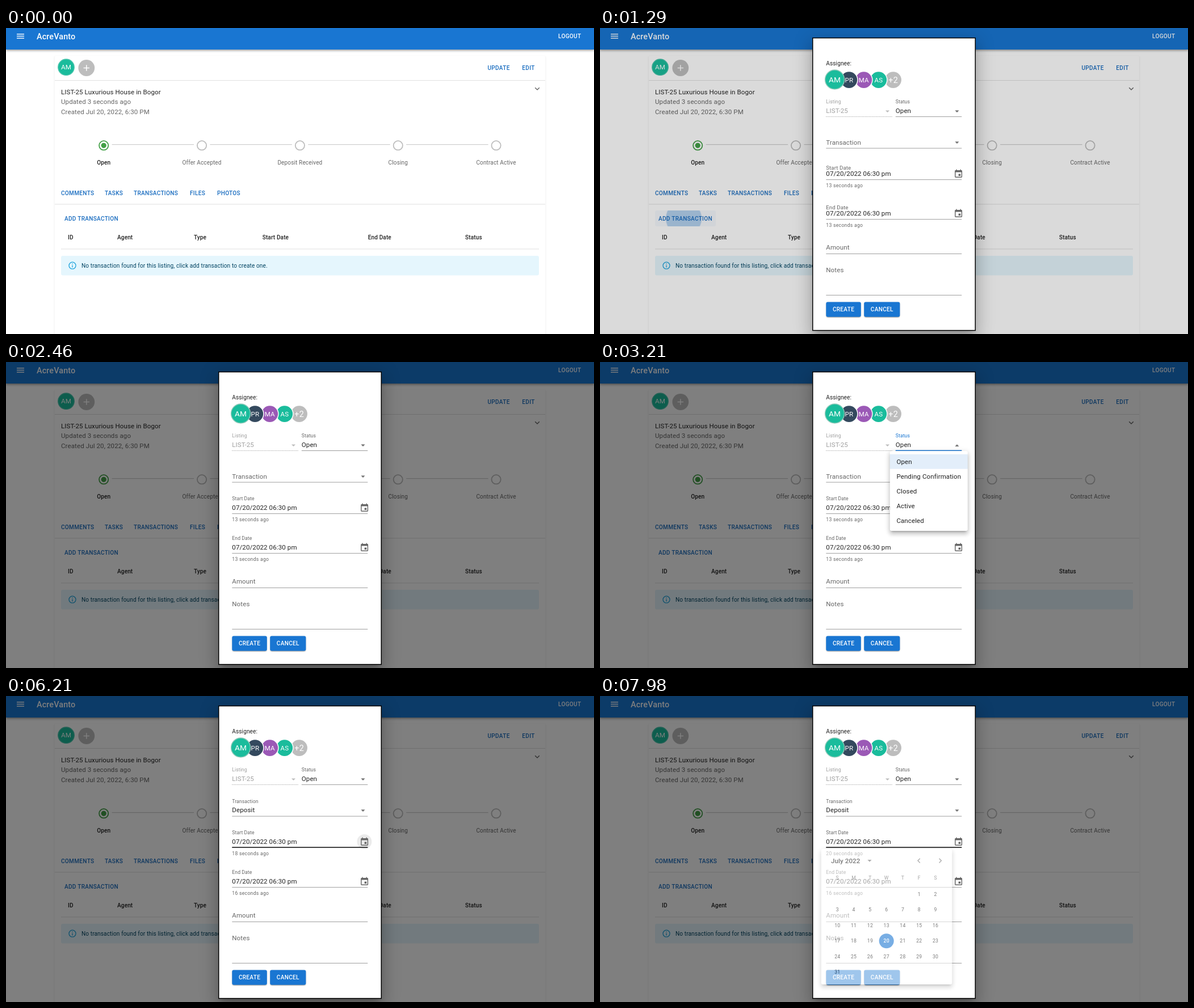
An HTML page that plays this animation: 1036x540 px, repeating every 8 s.

```html
<!DOCTYPE html>
<html lang="en">
<head>
<meta charset="utf-8">
<title>Add transaction</title>
<style>
  html, body { margin: 0; width: 100%; height: 100%; overflow: hidden; background: #fff; }
  svg {
    display: block; width: 1036px; height: 540px;
    --ease: cubic-bezier(.4, 0, .2, 1);
    --out: cubic-bezier(0, 0, .2, 1);
    --blue: #1976d2;
    --grey: rgba(0, 0, 0, .6);
  }
  text { font: 400 11.52px Roboto, sans-serif; letter-spacing: .00938em; fill: rgba(0, 0, 0, .87); white-space: pre; }
  .brand { font-size: 14.4px; font-weight: 500; letter-spacing: .0075em; }
  .small { font-size: 10.08px; letter-spacing: .01071em; }
  .btn { font-size: 10.08px; font-weight: 500; letter-spacing: .02857em; fill: #1a6dc0; }
  .cap { font-size: 8.64px; letter-spacing: .0333em; }
  .lab { font-size: 8.64px; }
  .dim { fill: var(--grey); }
  .off { fill: rgba(0, 0, 0, .38); }
  .white { fill: #fff; }
  .bold { font-weight: 500; }
  .mid { text-anchor: middle; }
  .info { fill: #014361; }

  /* 1% = 80 ms */
  .anim { animation: 8s var(--ease) infinite; }
  .step { animation: 8s step-end infinite; }
  .out { animation: 8s var(--out) infinite; }

  .hover { animation-name: hover; }
  .ripple { animation-name: ripple; transform-origin: 147.5px 336px; }
  .backdrop { animation-name: backdrop; }
  .modal { animation-name: modal; }
  .date-label { animation-name: date-label; }
  @keyframes hover { 0%, 6% { opacity: 0 } 9.1%, 15.9% { opacity: 1 } 19%, 100% { opacity: 0 } }
  @keyframes ripple {
    0%, 13.6% { transform: scale(0); opacity: .1 }
    15.4% { opacity: .3 }
    20.5%, 100% { transform: scale(1) }
    22.25%, 100% { opacity: 0 }
  }
  @keyframes backdrop { 0%, 15.375% { opacity: 0 } 18.2%, 100% { opacity: .5 } }
  @keyframes modal { 0% { opacity: 0 } 15.375%, 100% { opacity: 1 } }
  @keyframes date-label {
    0%, 15.375% { transform: translate(0, 16.5px) scale(1.3333) }
    17.875%, 100% { transform: translate(0, 0) scale(1) }
  }

  .status-label { animation-name: status-label; }
  .status-hover { animation-name: status-hover; }
  .status-focus { animation-name: status-focus; transform-origin: 579px 156px; }
  .status-arrow { animation-name: status-arrow; }
  .status-menu { animation-name: status-menu; transform-origin: 579.5px 157px; }
  @keyframes status-label { 0%, 34.5% { fill: var(--grey) } 37%, 48% { fill: var(--blue) } 50.5%, 100% { fill: var(--grey) } }
  @keyframes status-hover { 0%, 30.6% { opacity: 0 } 32.6%, 34.5% { opacity: 1 } 36.8%, 100% { opacity: 0 } }
  @keyframes status-focus { 0%, 34.5% { transform: scaleX(0) } 37%, 48% { transform: scaleX(1) } 50.5%, 100% { transform: scaleX(0) } }
  @keyframes status-arrow { 0% { transform: scaleY(1) } 34.5% { transform: scaleY(-1) } 41.9%, 100% { transform: scaleY(1) } }
  @keyframes status-menu {
    0%, 34.3% { opacity: 0; transform: scale(.75, .5625) }
    36.6%, 43% { transform: scale(1, 1) }
    37.8%, 41.9% { opacity: 1 }
    45.4%, 100% { opacity: 0; transform: scale(.75, .5625) }
  }

  .type-label { animation-name: type-label; }
  .type-focus { animation-name: type-focus; transform-origin: 518px 212px; }
  .type-arrow { animation-name: type-arrow; }
  .type-menu { animation-name: type-menu; transform-origin: 518px 213px; }
  .type-value { animation-name: type-value; }
  @keyframes type-label {
    0%, 48% { transform: translate(0, 16.5px) scale(1.3333); fill: var(--grey) }
    50.5%, 100% { transform: translate(0, 0) scale(1) }
    50.5%, 73.1% { fill: var(--blue) }
    75.6%, 100% { fill: var(--grey) }
  }
  @keyframes type-focus { 0%, 48% { transform: scaleX(0) } 50.5%, 73.1% { transform: scaleX(1) } 75.6%, 100% { transform: scaleX(0) } }
  @keyframes type-arrow { 0% { transform: scaleY(1) } 48.4% { transform: scaleY(-1) } 58.1%, 100% { transform: scaleY(1) } }
  @keyframes type-menu {
    0%, 48.4% { opacity: 0; transform: scale(.75, .5625) }
    50.6%, 59.2% { transform: scale(1, 1) }
    51.7%, 58.1% { opacity: 1 }
    61.4%, 100% { opacity: 0; transform: scale(.75, .5625) }
  }
  @keyframes type-value { 0% { opacity: 0 } 58.3%, 100% { opacity: 1 } }

  .ago13 { animation-name: ago13; }
  .ago16 { animation-name: ago16; }
  .ago16-end { animation-name: ago16-end; }
  .ago18 { animation-name: ago18; }
  .ago20 { animation-name: ago20; }
  @keyframes ago13 { 0% { opacity: 1 } 58.5%, 100% { opacity: 0 } }
  @keyframes ago16 { 0% { opacity: 0 } 58.5% { opacity: 1 } 76.9%, 100% { opacity: 0 } }
  @keyframes ago16-end { 0% { opacity: 0 } 58.5%, 100% { opacity: 1 } }
  @keyframes ago18 { 0% { opacity: 0 } 76.9% { opacity: 1 } 98.2%, 100% { opacity: 0 } }
  @keyframes ago20 { 0% { opacity: 0 } 98.2%, 100% { opacity: 1 } }

  .start-hover { animation-name: start-hover; }
  .icon-hover { animation-name: icon-hover; }
  .picker { animation-name: picker; transform-origin: 505px 270px; }
  @keyframes start-hover { 0%, 64.3% { opacity: 0 } 67.5%, 100% { opacity: 1 } }
  @keyframes icon-hover { 0%, 73.1% { opacity: 0 } 75%, 78.75% { opacity: 1 } 80.6%, 100% { opacity: 0 } }
  @keyframes picker {
    0%, 78.6% { opacity: 0; transform: scale(.75, .5625) }
    81.3%, 100% { transform: scale(1, 1) }
    82.6% { opacity: 1 }
    98.46% { opacity: 1; animation-timing-function: cubic-bezier(.557, 0, .667, .518) }
    100% { opacity: .45 }
  }
</style>
</head>
<body>
<svg id="stage" viewBox="0 0 1036 540" xmlns="http://www.w3.org/2000/svg"></svg>
<script>
  const range = n => [...Array(n).keys()];
  const each = (list, fn) => list.map(fn).join('');

  // y is the middle of the capitals
  const text = (x, y, str, cls = '') => `<text x="${x}" y="${y}" dy=".355em" class="${cls}">${str}</text>`;
  const rect = (x, y, w, h, fill, rx = 0, extra = '') =>
    `<rect x="${x}" y="${y}" width="${w}" height="${h}" rx="${rx}" fill="${fill}" ${extra}/>`;
  const circle = (x, y, r, fill, extra = '') => `<circle cx="${x}" cy="${y}" r="${r}" fill="${fill}" ${extra}/>`;
  const path = (d, stroke, width) => `<path d="${d}" fill="none" stroke="${stroke}" stroke-width="${width}"/>`;

  // shadow layers: offset, blur, spread, alpha
  const SHADOW = {
    card: [[.7, 2.2, 0, .12]],
    button: [[2.2, .7, -1.4, .2], [1.4, 1.4, 0, .14], [.7, 3.6, 0, .12]],
    bar: [[1.4, 2.9, -.7, .2], [2.9, 3.6, 0, .14], [.7, 7.2, 0, .12]],
    menu: [[3.6, 3.6, -2.2, .2], [5.8, 7.2, .7, .14], [2.2, 10, 1.4, .12]],
    modal: [[7.9, 10.8, -5, .2], [17.3, 27.4, 2.2, .14], [6.5, 33, 5.8, .12]]
  };
  const paper = (x, y, w, h, level, fill = '#fff', rx = 3) =>
    each(SHADOW[level], ([dy, blur, s, a]) =>
      rect(x - s, y + dy - s, w + 2 * s, h + 2 * s, '#000', rx, `opacity="${a}" style="filter:blur(${blur / 2}px)"`)) +
    rect(x, y, w, h, fill, rx);

  const arrow = (x, y, alpha, cls = '') =>
    `<g transform="translate(${x} ${y})"><path class="${cls}" d="M-3.6-1.8h7.2L0 1.8z" fill="#000" fill-opacity="${alpha}"/></g>`;
  const underline = (x, y, w) => rect(x, y, w, .9, 'rgba(0,0,0,.42)');
  const thick = (x, y, w, fill, cls) => rect(x, y, w, 1.6, fill, 0, `class="${cls}"`);
  const floating = (y, str, cls) => `<g transform="translate(398.3 ${y})">${text(0, 0, str, 'lab dim ' + cls)}</g>`;
  const avatar = (x, y, r, fill, str, size, ring) =>
    circle(x, y, r, fill, `stroke="${ring}" stroke-width="1.44"`) +
    `<text x="${x}" y="${y}" dy=".355em" class="white mid" style="font-size:${size}px">${str}</text>`;
  const contained = (x, w, str) =>
    paper(x, 483.5, w, 26.3, 'button', '#1976d2') + text(x + w / 2, 496.7, str, 'btn white mid');

  function page() {
    const steps = ['Open', 'Offer Accepted', 'Deposit Received', 'Closing', 'Contract Active'];
    const tabs = [[97, 'COMMENTS'], [174, 'TASKS'], [225, 'TRANSACTIONS'], [324, 'FILES'], [372, 'PHOTOS']];
    const cols = [[109, 'ID'], [196, 'Agent'], [331, 'Type'], [451.7, 'Start Date'], [637.7, 'End Date'], [809, 'Status']];
    const stepX = i => 172.2 + 172.85 * i;
    return paper(85.5, 49, 865, 600, 'card') +
      paper(0, -10, 1036, 48, 'bar', '#1976d2', 0) +
      each([10.1, 13.7, 17.3], y => rect(19, y, 13, 1.44, '#fff')) +
      text(54, 14.4, 'AcreVanto', 'brand white') +
      text(973, 14.5, 'LOGOUT', 'btn white') +
      avatar(106, 69.2, 14.2, '#1abc9c', 'AM', 11.6, '#4cc5ad') +
      circle(141.8, 70.5, 14.4, '#bdbdbd') + path('M136.6 70.5h10.4M141.8 65.3v10.4', '#fff', 1.5) +
      text(848.5, 70.5, 'UPDATE', 'btn') + text(909.3, 70.5, 'EDIT', 'btn') +
      rect(86, 92, 864, 1, '#e0e0e0') +
      text(97, 113, 'LIST-25 Luxurious House in Bogor') +
      text(97, 130.3, 'Updated 3 seconds ago', 'dim') +
      text(97, 147.5, 'Created Jul 20, 2022, 6:30 PM', 'dim') +
      path('M932.2 105.3l3.8 3.8 3.8-3.8', '#666', 1.4) +
      each(steps, (name, i) => {
        const x = stepX(i);
        return circle(x, 207.3, 8.1, 'none', `stroke="${i ? '#bdbdbd' : '#43a047'}" stroke-width="1.8"`) +
          (i ? rect(x - 158.5, 205.2, 144.5, 1, '#c4c4c4') : circle(x, 207.3, 4.6, '#43a047')) +
          text(x, 237, name, 'small mid ' + (i ? 'dim' : 'bold'));
      }) +
      each(tabs, ([x, name]) => text(x, 291.8, name, 'btn')) +
      rect(86, 310.5, 864, 1, '#e0e0e0') +
      rect(97, 322, 107, 28, 'rgba(25,118,210,.05)', 3, 'class="anim hover"') +
      `<g clip-path="url(#btn)">${circle(147.5, 336, 58, '#1976d2', 'class="anim ripple"')}</g>` +
      text(103, 336, 'ADD TRANSACTION', 'btn') +
      each(cols, ([x, name]) => text(x, 369.3, name, 'small bold')) +
      rect(97, 389.5, 842, 1, '#e0e0e0') +
      rect(97, 402, 842, 34.5, '#e5f6fd', 3) +
      circle(117, 419.2, 6, 'none', 'stroke="#1ea3dc" stroke-width="1.3"') +
      path('M117 418.5v4M117 415.6v1.4', '#1ea3dc', 1.3) +
      text(133, 419.2, 'No transaction found for this listing, click add transaction to create one.', 'small info');
  }

  function dateField(y, name) {
    const icon = 'M17 12h-5v5h5zM16 1v2H8V1H6v2H5a2 2 0 0 0-2 2v14a2 2 0 0 0 2 2h14a2 2 0 0 0 2-2V5a2 2 0 0 0-2-2h-1V1zm3 18H5V8h14z';
    return floating(y, name, 'out date-label') +
      text(398.3, y + 15.5, '07/20/2022 06:30 pm') +
      underline(398.3, y + 26.2, 239) +
      `<path transform="translate(623 ${y + 7.8}) scale(.72)" d="${icon}" fill="#666"/>`;
  }
  const ago = (y, n, cls) => text(398.3, y, n + ' seconds ago', 'cap dim step ' + cls);

  function modal() {
    const people = [[516.6, '#bdbdbd', '+2', 14.4], [490.8, '#1abc9c', 'AS', 11.5], [464.8, '#9b59b6', 'MA', 11.5], [438.8, '#34495e', 'PR', 11.5]];
    return paper(374, 16.8, 288, 517.6, 'modal', '#000', 0) +
      rect(375.5, 18.3, 285, 514.6, '#fff') +
      text(398.3, 62, 'Assignee:', 'small') +
      each(people, ([x, fill, str, size]) => avatar(x, 91.6, 15.1, fill, str, size, '#fff')) +
      avatar(413.6, 91, 17, '#1abc9c', 'AM', 13.7, '#8ec9b9') +
      text(398.3, 130, 'Listing', 'lab off') + text(398.3, 145.7, 'LIST-25', 'off') +
      path('M398.3 156.5h117', 'rgba(0,0,0,.42)', '1" stroke-dasharray="1 1.4') +
      arrow(506.5, 147.2, .26) +
      text(520.8, 130, 'Status', 'lab anim status-label') + text(520.8, 145.7, 'Open') +
      underline(520.8, 156, 116.5) +
      thick(520.8, 155.5, 116.5, '#212121', 'anim status-hover') +
      thick(520.8, 155.5, 116.5, '#1976d2', 'out status-focus') +
      arrow(629, 147.2, .6, 'step status-arrow') +
      floating(185.5, 'Transaction', 'out type-label') +
      text(398.3, 201.2, 'Deposit', 'step type-value') +
      underline(398.3, 211.7, 239) +
      thick(398.3, 211.2, 239, '#1976d2', 'out type-focus') +
      arrow(629, 202.3, .6, 'step type-arrow') +
      circle(631.4, 257, 13, 'rgba(0,0,0,.08)', 'class="anim icon-hover"') +
      dateField(241, 'Start Date') + dateField(311, 'End Date') +
      thick(398.3, 266.3, 239, '#1c1c1c', 'anim start-hover') +
      ago(278, 13, 'ago13') + ago(278, 16, 'ago16') + ago(278, 18, 'ago18') + ago(278, 20, 'ago20') +
      ago(348, 13, 'ago13') + ago(348, 16, 'ago16-end') +
      text(398.3, 387, 'Amount', 'dim') + underline(398.3, 398, 239) +
      text(398.3, 427, 'Notes', 'dim') + underline(398.3, 471, 239) +
      contained(398.3, 61.5, 'CREATE') + contained(465.2, 63.2, 'CANCEL');
  }

  const menu = (x, y, w, h, active, items) =>
    paper(x, y, w, h, 'menu') + rect(x, y + 5.8, w, 25.9, active) +
    each(items, (name, i) => text(x + 11.6, y + 18.6 + 26 * i, name));

  function calendar() {
    const x = col => 418.3 + 28.8 * col;
    return paper(389.7, 270, 230.6, 239, 'menu') +
      text(407, 290.6, 'July 2022', 'bold') + arrow(475, 290.9, .54) +
      path('M563.8 286.8l-3.8 3.8 3.8 3.8M597.6 286.8l3.8 3.8-3.8 3.8', '#757575', 1.4) +
      each([...'SMTWTFS'], (d, i) => text(x(i), 321, d, 'cap mid dim')) +
      circle(x(3), 432.2, 13, '#1976d2') +
      each(range(31), i => {
        const cell = i + 5;
        return text(x(cell % 7), 350 + 27.4 * Math.floor(cell / 7), i + 1, 'cap mid ' + (i === 19 ? 'white bold' : ''));
      });
  }

  const group = (cls, body) => `<g class="${cls}">${body}</g>`;
  document.getElementById('stage').innerHTML =
    `<clipPath id="btn">${rect(97, 322, 107, 28, '#000', 3)}</clipPath>` +
    page() +
    rect(0, 0, 1036, 540, '#000', 0, 'class="anim backdrop"') +
    group('step modal', modal()) +
    group('anim status-menu', menu(510.8, 157, 137, 141, 'rgba(25,118,210,.12)',
      ['Open', 'Pending Confirmation', 'Closed', 'Active', 'Canceled'])) +
    group('anim type-menu', menu(398.3, 212.7, 239, 115, 'rgba(0,0,0,.04)',
      ['Deposit', 'Sale', 'Lease', 'Expense'])) +
    group('anim picker', calendar());
</script>
</body>
</html>
```
